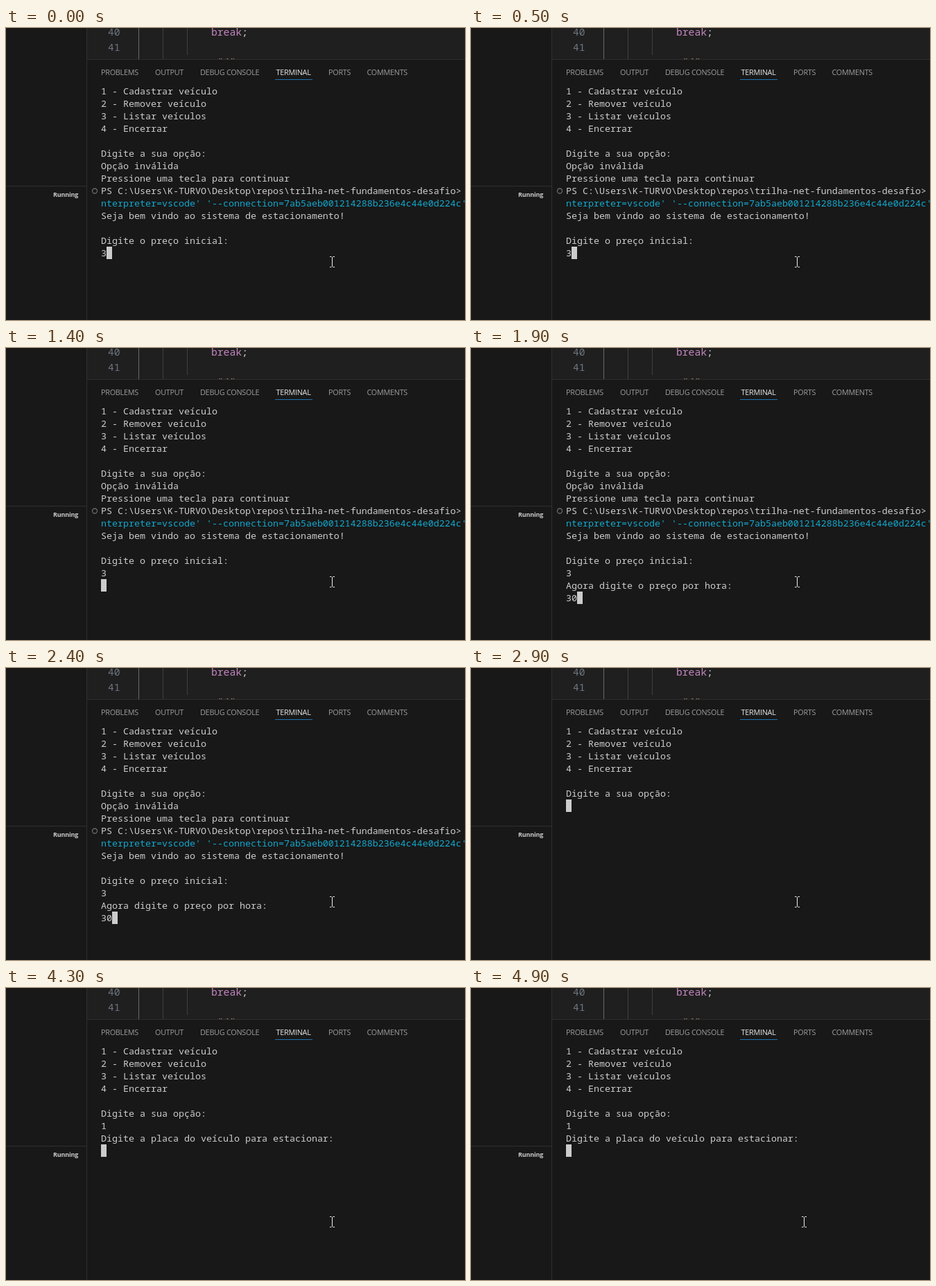
An HTML page that plays this animation: 662 px wide and 422 px high, repeating every 5 s.

```html
<!DOCTYPE html>
<html lang="pt-BR">
<head>
<meta charset="utf-8">
<title>Terminal</title>
<style>
  html, body { margin: 0; width: 100%; height: 100%; overflow: hidden; background: #181818; }
  svg { display: block; width: 662px; height: 422px; }
  text { white-space: pre; }
  .term { font: 13.333px "Noto Sans Mono", monospace; fill: #ccc; }
  .code { font: 14.667px "Noto Sans Mono", monospace; fill: #6e7681; }
  .tabs { font: 10.8px "Open Sans", sans-serif; letter-spacing: -.25px; fill: #9d9d9d; }
  .status { font: bold 9px "Open Sans", sans-serif; letter-spacing: -.2px; fill: #ccc; }
  .active { fill: #e7e7e7; }
  .command { fill: #11a8cd; }
  .keyword { fill: #c586c0; }
  .string { fill: #ce9178; }
  .plain { fill: #ccc; }

  .step { animation: 5s step-end infinite; }
  .session { animation-name: session; }
  .hourly { animation-name: hourly; }
  .digit1 { animation-name: digit1; }
  .digit2 { animation-name: digit2; }
  .choice { animation-name: choice; }
  .plate { animation-name: plate; }
  .cursor { animation-name: cursor; fill: #ccc; }
  .mouse { animation-name: mouse; }

  @keyframes session { 0% { visibility: visible } 58%, 100% { visibility: hidden } }
  @keyframes hourly { 0%, 58%, 100% { visibility: hidden } 30% { visibility: visible } }
  @keyframes digit1 { 0%, 58%, 100% { visibility: hidden } 34% { visibility: visible } }
  @keyframes digit2 { 0%, 58%, 100% { visibility: hidden } 36% { visibility: visible } }
  @keyframes choice { 0% { visibility: hidden } 78%, 100% { visibility: visible } }
  @keyframes plate { 0% { visibility: hidden } 84%, 100% { visibility: visible } }
  @keyframes cursor {
    0% { transform: translate(145px, 316px) }
    24% { transform: translate(137px, 334px) }
    30% { transform: translate(137px, 352px) }
    34% { transform: translate(145px, 352px) }
    36% { transform: translate(153px, 352px) }
    58% { transform: translate(137px, 190px) }
    78% { transform: translate(145px, 190px) }
    84%, 100% { transform: translate(137px, 226px) }
  }
  @keyframes mouse {
    0% { transform: translate(470px, 338px) }
    94% { transform: translate(472px, 338px) }
    96% { transform: translate(476px, 338px) }
    98%, 100% { transform: translate(480px, 338px) }
  }
</style>
</head>
<body>
<svg viewBox="0 0 662 422">
  <defs><clipPath id="editor"><rect x="117" width="545" height="45"/></clipPath></defs>
  <rect width="662" height="422" fill="#181818"/>

  <g class="code" clip-path="url(#editor)">
    <rect x="117" width="545" height="45" fill="#1f1f1f"/>
    <path d="M226.5 0V45M261.5 0V39" stroke="#404040"/>
    <path d="M191.5 0V45" stroke="#686868"/>
    <text x="147" y="11">40</text>
    <text x="147" y="33">41</text>
    <text x="296" y="11" class="keyword">break<tspan class="plain">;</tspan></text>
    <text x="261" y="54" class="keyword">case <tspan class="string">"4"</tspan><tspan class="plain">:</tspan></text>
  </g>
  <path d="M117 45.5H662M116.5 0V422M0 228.5H116" stroke="#2f2f2f"/>
  <text class="status" x="68" y="244">Running</text>

  <g class="tabs">
    <text x="137" y="68">PROBLEMS</text>
    <text x="215" y="68">OUTPUT</text>
    <text x="280" y="68">DEBUG CONSOLE</text>
    <text x="389.5" y="68" class="active">TERMINAL</text>
    <text x="465" y="68">PORTS</text>
    <text x="520.5" y="68">COMMENTS</text>
    <rect x="388" y="74" width="54" height="1" fill="#1f74b5"/>
  </g>

  <g class="term">
    <text x="137" y="96">1 - Cadastrar veículo</text>
    <text x="137" y="114">2 - Remover veículo</text>
    <text x="137" y="132">3 - Listar veículos</text>
    <text x="137" y="150">4 - Encerrar</text>
    <text x="137" y="186">Digite a sua opção:</text>

    <g class="step session">
      <text x="137" y="204">Opção inválida</text>
      <text x="137" y="222">Pressione uma tecla para continuar</text>
      <circle cx="128" cy="235.5" r="3.5" fill="none" stroke="#6c6c6c" stroke-width="1.3"/>
      <text x="137" y="240">PS C:\Users\K-TURVO\Desktop\repos\trilha-net-fundamentos-desafio&gt;</text>
      <text x="137" y="258" class="command">nterpreter=vscode' '--connection=7ab5aeb001214288b236e4c44e0d224c'</text>
      <text x="137" y="276">Seja bem vindo ao sistema de estacionamento!</text>
      <text x="137" y="312">Digite o preço inicial:</text>
      <text x="137" y="330">3</text>
    </g>
    <text x="137" y="348" class="step hourly">Agora digite o preço por hora:</text>
    <text x="137" y="366" class="step digit1">3</text>
    <text x="145" y="366" class="step digit2">0</text>

    <text x="137" y="204" class="step choice">1</text>
    <text x="137" y="222" class="step plate">Digite a placa do veículo para estacionar:</text>
    <rect class="step cursor" width="8" height="18"/>
  </g>

  <path class="step mouse" d="M-3 -7.5H-.5M1.5 -7.5H4M.5 -7V7M-3 7.5H-.5M1.5 7.5H4" fill="none" stroke="#f0f0f0"/>
</svg>
</body>
</html>
```
